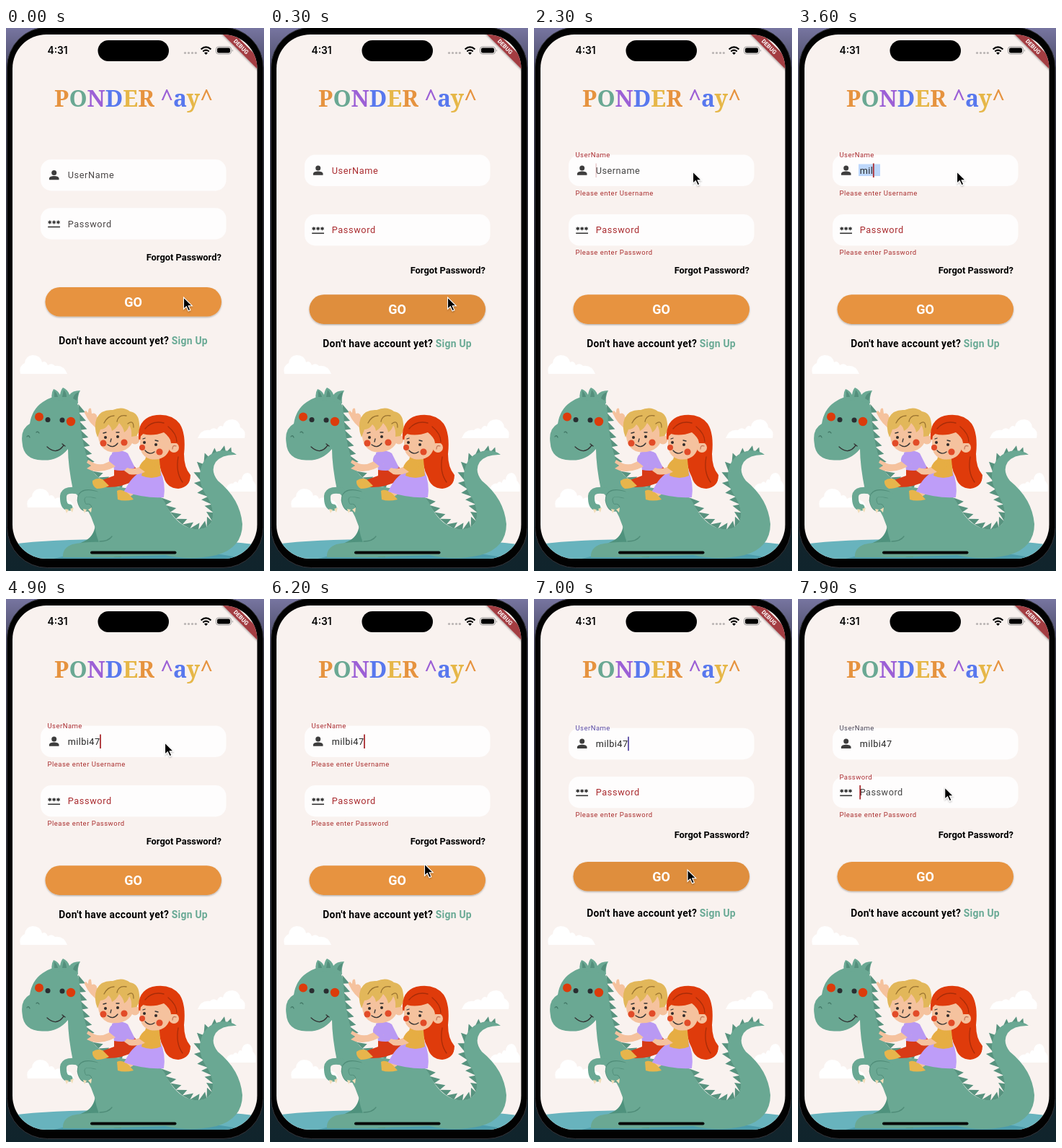
An HTML page for the animation above (8 s loop, 358 px wide and 752 px high).

```html
<!DOCTYPE html>
<html lang="en">
<head>
<meta charset="utf-8">
<title>Login screen</title>
<style>
html, body { margin: 0; width: 100%; height: 100%; overflow: hidden; background: #10151d; }
svg { display: block; width: 100vw; height: 100vh; font-family: Roboto, sans-serif; }
.title { font: 700 32px "Noto Serif", serif; }
.label { font-size: 12.7px; letter-spacing: .63px; }
.hint { font-size: 12.7px; letter-spacing: .5px; fill: #444; }
.typed { font-size: 12.7px; letter-spacing: .43px; fill: #262626; }
.error { font-size: 9.5px; letter-spacing: .5px; fill: #aa3030; }
.bold { font-weight: 700; }
.line { fill: none; stroke: #333; stroke-width: 1.3; stroke-linecap: round; }
.arm { fill: none; stroke: #6aa893; stroke-width: 9; stroke-linecap: round; }
.arm.edge { stroke: #4f8c78; stroke-width: 10.6; }
</style>
</head>
<body>
<svg viewBox="0 0 358 752" preserveAspectRatio="none">
<defs>
  <linearGradient id="desk" x2="0" y2="1">
    <stop offset="0" stop-color="#7775a0"/><stop offset=".1" stop-color="#3d3e55"/>
    <stop offset=".5" stop-color="#23262f"/><stop offset="1" stop-color="#10242c"/>
  </linearGradient>
  <clipPath id="screen"><rect x="9" y="9" width="339.5" height="726" rx="47"/></clipPath>
  <filter id="soft" x="-10%" y="-20%" width="120%" height="150%">
    <feDropShadow dx="0" dy="1.2" stdDeviation="1" flood-opacity=".3"/>
  </filter>
  <path id="cloud" fill="#fff" d="M1 26Q-2 15 7 11Q8 1 18 0Q29 0 31 10Q36 7 39 14Q45 10 49 15Q61 13 66 26Z"/>
  <g id="person" fill="#3d3d3d"><circle r="3.5" cy="-3.4"/><path d="M-6.8 6.4V4.6C-6.8 .1 6.8 .1 6.8 4.6V6.4Z"/></g>
  <path id="star" fill="none" stroke="#333" stroke-width="1.3" d="M0-2.4V2.4M-2.2-1.2L2.2 1.2M-2.2 1.2L2.2-1.2"/>
</defs>

<rect width="358" height="752" fill="url(#desk)"/>
<rect x="1.5" y="-1" width="355.5" height="748.5" rx="56" fill="#020202" stroke="#34353b"/>

<g clip-path="url(#screen)">
  <rect width="358" height="752" fill="#f9f2ef"/>

  <g id="scene">
    <use href="#cloud" x="19" y="453"/>
    <use href="#cloud" transform="translate(332 542) scale(-1 1)"/>
    <use href="#cloud" x="29" y="638"/>
    <use href="#cloud" transform="translate(347 616) scale(-.65 1)"/>
    <path fill="#68b3bd" d="M0 716Q60 707 170 708Q290 707 358 717V752H0Z"/>
    <path fill="#4c9cab" d="M66 735Q120 720 200 724Q280 723 330 735Z"/>

    <path fill="#4f927d" d="M96 733Q94 716 108 711Q122 705 124 688L160 700V733Z"/>
    <g id="spikes" fill="#58937f"></g>
    <g fill="#6aa893">
      <path d="M93 640Q86 606 86 583Q72 600 50 598.5Q24 598 22.5 574Q20 555 33 548Q36 528 51 518Q66 508 82 508Q100 511 102 532Q103 564 113 597Q122 632 165 637Q207 636 220 656Q236 691 262 694Q287 695 287 673Q286 658 277 646Q266 629 270 612Q275 589 300 585Q314 585 320 591Q300 590 291 601Q283 613 294 627Q325 652 328 687Q328 720 292 730Q256 738 221 730L140 733Q127 716 123 690Q115 664 93 640Z"/>
      <path d="M64 515Q62 506 66 500Q72 502 75 508Q76 501 79 498Q86 501 88 508Q92 502 103 502Q99 509 100 520L80 516Z"/>
      <path d="M79 733Q78 720 92 715Q114 711 132 712L150 733Z"/>
    </g>
    <path fill="#548f7c" d="M67 502Q71 506 72 511L67 511ZM80 501Q84 505 84 511H78ZM101 504Q94 507 93 513L98 516Z"/>
    <path class="line" style="stroke:#4f8c78" d="M130 711Q142 711 147 704"/>
    <path class="arm" d="M100 641Q78 637 79.500 652Q80 664 88 664"/>
    <path class="arm edge" d="M124 646Q104 640 104 654Q106 666 114 664"/>
    <path class="arm" d="M128 647Q104 640 104 654Q106 666 114 664"/>
    <path fill="#f2ddb7" d="M82 666L84 672L87 667ZM89 666L92 671L94 664ZM107 666L109 672L112 667ZM114 667L118 671L119 664Z"/>
    <g fill="#dc3b0b"><circle cx="46" cy="538.5" r="6"/><circle cx="90" cy="545" r="6.2"/></g>
    <g fill="#292d30"><circle cx="58" cy="542.5" r="3.5"/><circle cx="78" cy="543" r="3.5"/></g>
    <path class="line" d="M57 580Q70 592 80 578M78 576L82 579"/>
    <path class="line" style="stroke:#437967" d="M29 566Q31 563 33 567M42 560Q44 558 46 561"/>

    <g id="boy">
      <path fill="#f5c29e" d="M129 557Q115 547 110 535Q107 531 111 530L114 533Q114 525 118 527L119 534Q124 532 126 537Q126 542 133 546Z"/>
      <path fill="#d83a16" d="M150 608L177 606Q188 616 180 626Q160 637 137 636L128 628L150 620Z"/>
      <path fill="#e7b54c" d="M120 627Q126 622 134 625L143 634Q135 638 126 638Q119 634 120 627Z"/>
      <path fill="#b999f3" d="M147 588Q158 582 169 589L179 609Q166 615 150 612Z"/>
      <path fill="#f5c29e" d="M152 593Q138 608 123 603L114 598L112 602L118 606L112 610L119 613Q140 617 158 603Z"/>
      <path fill="#b999f3" d="M148 589Q142 594 143 600L153 608L165 596Z"/>
      <circle cx="179" cy="570" r="6.5" fill="#f5c29e"/>
      <path fill="#f5c29e" d="M128 552Q125 583 145 587Q174 590 179 564Q177 540 151 540Z"/>
      <path fill="#e2b75a" d="M127 567Q121 552 126 540Q132 528 148 529Q162 523 172 531Q184 533 185 548Q187 557 181 565L174 566Q175 556 171 550Q169 557 164 560Q163 553 157 547Q153 555 147 558Q146 552 142 549Q138 556 131 556Z"/>
      <path class="line" style="stroke:#9b7431" d="M136 547Q141 537 150 537M154 545Q156 535 167 537M169 548Q177 542 177 553"/>
      <g fill="#e24b28"><circle cx="135" cy="575" r="4.5"/><circle cx="164" cy="574" r="4.6"/></g>
      <g fill="#302b2a"><circle cx="138" cy="567" r="2"/><circle cx="155" cy="566" r="2"/></g>
      <path class="line" d="M141 577Q149 583 155 575M135 561L139 560M153 560L157 560M146 569L145 573"/>
    </g>

    <g id="girl">
      <path fill="#df3b0b" d="M184 569Q182 543 203 537Q228 532 241 548Q250 562 247 590Q247 609 256 619Q256 636 239 638Q223 637 219 622Q210 606 213 585Z"/>
      <path fill="#f5c29e" d="M171 634L183 638Q176 650 166 650L160 645Z"/>
      <path fill="#e7b54c" d="M154 641Q161 637 171 646L177 653Q164 656 155 653Z"/>
      <path fill="#be9df8" d="M190 613L214 612Q222 631 219 650Q194 652 164 642Q174 620 190 613Z"/>
      <path fill="#e6ad43" d="M194 594Q205 590 213 598L215 620Q202 626 188 620Z"/>
      <path fill="#f5c29e" d="M190 605Q178 613 168 609L164 613L171 618Q187 621 202 609Z"/>
      <path fill="#e6ad43" d="M195 596Q186 602 185 609L196 617L210 605Z"/>
      <path fill="#f5c29e" d="M187 565Q182 592 200 597Q225 601 229 575Q226 550 201 552Z"/>
      <circle cx="233" cy="581" r="7" fill="#f5c29e"/>
      <path class="line" style="stroke:#c7785a" d="M231 583Q231 577 236 579"/>
      <path fill="#df3b0b" d="M184 571Q183 547 203 539Q225 536 239 554L238 575L230 575Q227 566 219 560Q203 566 190 562Q186 565 184 571Z"/>
      <path class="line" style="stroke:#a92c08" d="M193 555Q203 543 219 547M225 552Q237 562 237 573M239 594Q235 615 245 629"/>
      <g fill="#e24b28"><circle cx="189" cy="581" r="4"/><circle cx="213" cy="587" r="4.6"/></g>
      <g fill="#302b2a"><circle cx="192" cy="574" r="2"/><circle cx="208" cy="577" r="2"/></g>
      <path class="line" d="M193 585Q199 592 206 587M190 569L193 568M207 571L211 572"/>
    </g>
  </g>
  <rect x="117" y="724.5" width="119.5" height="4" rx="2" fill="#080808"/>

  <text x="57.5" y="36" font-family="Inter, sans-serif" font-weight="600" font-size="13.8">4:31</text>
  <rect x="127.5" y="17" width="98.5" height="29" rx="14.5"/>
  <g fill="#b9b4b3"><circle cx="248.5" cy="34.5" r="1.6"/><circle cx="253.5" cy="34.5" r="1.6"/><circle cx="258.5" cy="34.5" r="1.6"/><circle cx="263.3" cy="34.5" r="1.6"/></g>
  <g fill="none" stroke="#000" stroke-width="2.2">
    <path d="M270.6 29.5Q277.5 23.3 284.4 29.5M273.3 32.5Q277.5 28.9 281.7 32.5"/>
    <path fill="#000" stroke="none" d="M275 34.4Q277.5 32.5 280 34.4L277.5 37Z"/>
  </g>
  <rect x="291.5" y="26" width="21" height="10" rx="3.2" fill="none" stroke="#999"/>
  <rect x="293" y="27.5" width="18" height="7" rx="2"/>
  <path d="M314 29.5Q316 31 314 33Z" fill="#999"/>
  <g transform="translate(326.2 25.8) rotate(45)">
    <rect x="-50" y="-6" width="100" height="12" fill="#a33d43" filter="url(#soft)"/>
    <text class="bold" y="2.8" text-anchor="middle" font-size="8" fill="#fff">DEBUG</text>
  </g>

  <text class="title" id="title" x="177" y="109" text-anchor="middle"></text>

  <g id="userField">
    <rect x="48" width="257.5" height="43.5" rx="15" fill="#fefdfd"/>
    <use href="#person" x="66.7" y="21.8"/>
  </g>
  <g id="passField">
    <rect x="48" width="257.5" height="43.5" rx="15" fill="#fefdfd"/>
    <use href="#star" x="60.7" y="19.8"/><use href="#star" x="66.6" y="19.8"/><use href="#star" x="72.5" y="19.8"/>
    <path stroke="#333" stroke-width="1.6" d="M58.2 26.3H75"/>
  </g>

  <text class="bold" id="forgot" x="298.8" text-anchor="end" font-size="12.85">Forgot Password?</text>
  <g id="button">
    <rect x="54.5" width="244.5" height="40.6" rx="20.3" fill="#e7933f" filter="url(#soft)"/>
    <rect id="press" x="54.5" width="244.5" height="40.6" rx="20.3" fill="#805020" opacity="0"/>
    <text x="176.5" y="26.6" text-anchor="middle" font-size="18" font-weight="600" fill="#fff">GO</text>
  </g>
  <text class="bold" id="signup" x="176.6" text-anchor="middle" font-size="13.85" letter-spacing=".27">Don't have account yet? <tspan fill="#68a994">Sign Up</tspan></text>
</g>

<path id="cursor" d="M0 0V16.2L3.8 12.7L6.6 18.8L9.3 17.6L6.6 11.7H11.7Z" stroke="#fff" stroke-width="1.1" filter="url(#soft)"/>
</svg>

<script>
const LOOP = 8000;
const SUBMIT_1 = 300, FOCUS_USER = 1435, SUBMIT_2 = 6800, FOCUS_PASS = 7710;
const RED = '#aa2c30', DARK = '#4a4646', PURPLE = '#5b4ba4';
const NAME = 'milbi47';
const KEYS = [3100, 3300, 3600, 3700, 4200, 4600, 4900];
const LAYOUTS = [
  { user: 182, pass: 249.2, forgot: 322.3, button: 359, signup: 438 },
  { user: 175.5, pass: 258, forgot: 339.7, button: 369.3, signup: 441.7 },
  { user: 178.7, pass: 246, forgot: 331.3, button: 364, signup: 440 }
];
const MOVES = [[0, 246.5, 373], [350, 246.5, 373], [900, 223.5, 207], [1000, 223.5, 207], [1350, 220.5, 199],
  [5750, 220.5, 199], [6180, 214.5, 367], [6300, 214.5, 367], [6650, 213, 375], [7480, 213, 375], [7740, 203.7, 261]];

const $ = id => document.getElementById(id);
const clamp = v => Math.max(0, Math.min(1, v));
const ease = p => p * p * (3 - 2 * p);
const ramp = (t, start, length = 167) => ease(clamp((t - start) / length));
const mix = (a, b, p) => a + (b - a) * p;

function add(parent, tag, attrs, text = '') {
  const el = document.createElementNS('http://www.w3.org/2000/svg', tag);
  set(el, attrs);
  el.textContent = text;
  return parent.appendChild(el);
}

function set(el, attrs) {
  for (const key in attrs) el.setAttribute(key, attrs[key]);
}

function makeField(id, label, hint) {
  const root = $(id);
  return {
    root,
    mark: add(root, 'rect', { x: 84, y: 13, height: 16.5, fill: '#bdd7fb' }),
    hint: add(root, 'text', { class: 'hint', x: 85.7, y: 26.4 }, hint),
    typed: add(root, 'text', { class: 'typed', x: 85.7, y: 26.4 }),
    label: add(root, 'text', { class: 'label' }, label),
    error: add(root, 'text', { class: 'error', x: 57.4, y: 56 }, 'Please enter ' + hint),
    caret: add(root, 'rect', { y: 12, width: 1.8, height: 19.5 })
  };
}

function drawField(f, s) {
  set(f.root, { transform: `translate(0 ${s.y})` });
  const x = mix(85.7, 57.4, s.float), y = mix(26.4, 3.6, s.float);
  set(f.label, { transform: `translate(${x} ${y}) scale(${mix(1, .75, s.float)})`, fill: s.color });
  set(f.hint, { opacity: s.typed ? 0 : s.float });
  f.typed.textContent = s.typed;
  set(f.error, { opacity: s.error });
  set(f.mark, { width: s.mark });
  const width = s.typed ? f.typed.getComputedTextLength() : 0;
  set(f.caret, { x: 85.3 + width, opacity: s.caret, fill: s.caretColor });
}

// Half a second on, then a short fade out and back in.
function blink(t, start) {
  if (t < start) return 0;
  const p = (t - start) % 1000;
  return p < 500 ? 1 : p < 750 ? clamp((650 - p) / 150) : clamp((p - 835) / 150);
}

function pointer(t) {
  const i = MOVES.findIndex(m => m[0] > t);
  if (i < 0) return MOVES[MOVES.length - 1].slice(1);
  const [a, b] = [MOVES[i - 1], MOVES[i]];
  const p = ease((t - a[0]) / (b[0] - a[0]));
  return [mix(a[1], b[1], p), mix(a[2], b[2], p)];
}

const pressed = (t, at) => ramp(t, at - 120, 100) * (1 - ramp(t, at + 180, 250));

function growSpikes(d, gap, size) {
  const path = add($('spikes'), 'path', { d, fill: 'none' });
  const total = path.getTotalLength();
  for (let s = gap; s < total; s += gap) {
    const a = path.getPointAtLength(s - gap * .6), b = path.getPointAtLength(s + gap * .4);
    const dx = (b.x - a.x) / gap, dy = (b.y - a.y) / gap;
    const x = b.x + dy * size, y = b.y - dx * size;
    add($('spikes'), 'path', { d: `M${a.x} ${a.y}L${x} ${y}L${b.x} ${b.y}Z` });
  }
}

growSpikes('M100 516Q102 564 112 597Q121 630 164 637', 12, 9);
growSpikes('M213 646Q236 691 262 695Q288 696 288 673Q287 658 278 646Q267 629 271 612Q276 590 313 587', 12, 10);

const colors = ['#e6933f', '#6aa893', '#9c60d6', '#5878ee', '#e6b748', '#e6933f', '', '#9c60d6', '#5878ee', '#e6b748', '#e6933f'];
[...'PONDER ^ay^'].forEach((c, i) => add($('title'), 'tspan', { fill: colors[i] || 'none' }, c));

const user = makeField('userField', 'UserName', 'Username');
const pass = makeField('passField', 'Password', 'Password');

function draw(t) {
  const stage = t < SUBMIT_1 ? 0 : t < SUBMIT_2 ? 1 : 2;
  const place = LAYOUTS[stage];
  const count = KEYS.filter(k => k <= t).length;
  const onPass = t >= FOCUS_PASS;
  const shown = ramp(t, SUBMIT_1);

  drawField(user, {
    y: place.user,
    float: ramp(t, FOCUS_USER),
    color: [DARK, RED, onPass ? '#4b4658' : PURPLE][stage],
    typed: NAME.slice(0, count),
    error: shown * (1 - ramp(t, SUBMIT_2, 120)),
    mark: t < 3300 || t >= 4200 ? 0 : t < 3600 ? 20 : 30,
    caret: onPass ? 0 : blink(t, count ? KEYS[count - 1] : FOCUS_USER),
    caretColor: stage === 2 ? PURPLE : RED
  });
  drawField(pass, {
    y: place.pass,
    float: ramp(t, FOCUS_PASS),
    color: stage ? RED : DARK,
    typed: '',
    error: shown,
    mark: 0,
    caret: blink(t, FOCUS_PASS),
    caretColor: RED
  });

  set($('forgot'), { y: place.forgot });
  set($('signup'), { y: place.signup });
  set($('button'), { transform: `translate(0 ${place.button})` });
  set($('press'), { opacity: .08 * Math.max(pressed(t, SUBMIT_1), pressed(t, SUBMIT_2)) });
  set($('cursor'), { transform: `translate(${pointer(t)})` });
}

const start = performance.now();
function tick() {
  draw((performance.now() - start) % LOOP);
  requestAnimationFrame(tick);
}
tick();
</script>
</body>
</html>
```
